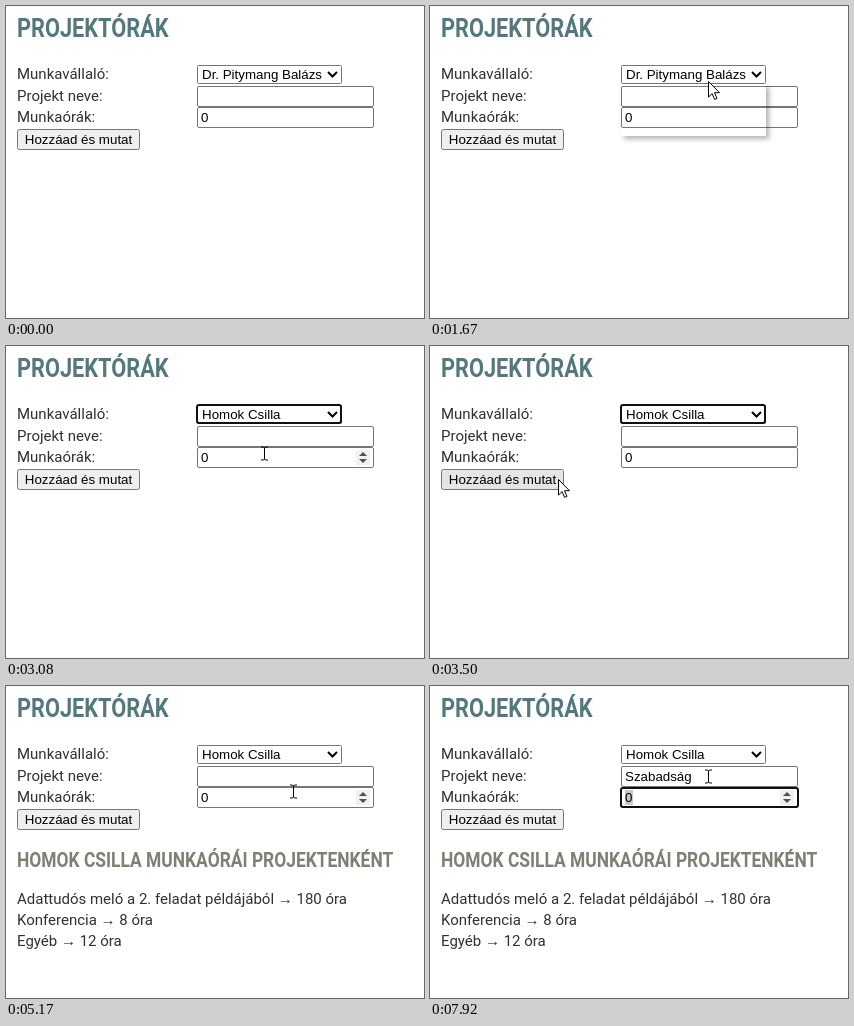
Animation, 418 px wide and 312 px high, one loop 8 s. Source, as an HTML page:

```html
<!DOCTYPE html>
<html lang="hu">
<head>
<meta charset="utf-8">
<title>Projektórák</title>
<style>
  html, body { margin: 0; width: 100%; height: 100%; overflow: hidden; background: #fff; }
  svg { position: absolute; left: 0; top: 0; }
  text { font: 15px Roboto, sans-serif; fill: #2e3135; white-space: pre; }
  .title { font-weight: 700; transform: scaleX(.87); }
  .ctl { font: 13.333px "Liberation Sans", Arial, sans-serif; fill: #000; }
  .box { fill: #fff; stroke: #767676; }
  .ring { fill: none; stroke: #101010; stroke-width: 2; }
  #popup { position: absolute; left: 191px; top: 78px; width: 145px; height: 52px; box-sizing: border-box;
    box-shadow: 3px 3px 5px rgba(0,0,0,.3); font: 13.333px/16.5px "Liberation Sans", Arial, sans-serif; }
  #popup.open { background: #fff; border: 1px solid #767676; }
  #popup div { height: 16.6px; padding-left: 4px; visibility: hidden; }
  #popup.open div { visibility: visible; }
  #popup .hot { background: #1e90ff; color: #fff; }
</style>
</head>
<body>
<svg width="418" height="312">
  <g transform="translate(11 31)"><text class="title" style="font-size:25px;fill:#54787b">PROJEKTÓRÁK</text></g>
  <text x="11" y="73">Munkavállaló:</text>
  <text x="11" y="95">Projekt neve:</text>
  <text x="11" y="116">Munkaórák:</text>

  <rect class="box" x="191.5" y="59.5" width="144" height="18" rx="1"/>
  <text class="ctl" id="worker" x="196" y="73"></text>
  <path d="M322 66l4.5 4.5 4.5-4.5" fill="none" stroke="#000" stroke-width="2"/>
  <rect class="box" x="191.5" y="80.5" width="176" height="20" rx="1.5"/>
  <text class="ctl" id="project" x="195" y="95"></text>
  <path id="caret" stroke="#000"/>
  <rect class="box" x="191.5" y="101.5" width="176" height="20" rx="1.5"/>
  <rect id="marked" x="195" y="104" width="8" height="15" fill="#c8c8c8"/>
  <text class="ctl" x="195" y="116">0</text>
  <g id="spin">
    <rect x="350" y="104" width="14" height="15" fill="#f1f1f1"/>
    <path d="M353 110l4-4 4 4zM353 113l4 4 4-4z" fill="#505050"/>
  </g>
  <rect class="box" id="button" x="11.5" y="123.5" width="122" height="20" rx="2"/>
  <text class="ctl" x="72.5" y="138" text-anchor="middle">Hozzáad és mutat</text>

  <rect class="ring" id="ringWorker" x="191" y="59" width="144" height="18" rx="2"/>
  <rect class="ring" id="ringProject" x="191" y="81" width="177" height="19" rx="2"/>
  <rect class="ring" id="ringHours" x="191" y="102" width="177" height="19" rx="2"/>

  <g id="result">
    <g transform="translate(11 180.5)"><text class="title" style="font-size:20px;fill:#7f7f74">HOMOK CSILLA MUNKAÓRÁI PROJEKTENKÉNT</text></g>
    <text x="11" y="218">Adattudós meló a 2. feladat példájából → 180 óra</text>
    <text x="11" y="239">Konferencia → 8 óra</text>
    <text x="11" y="260">Egyéb → 12 óra</text>
  </g>
</svg>
<div id="popup"><div>Dr. Pitymang Balázs</div><div>Homok Csilla</div><div>Morzsa K. Ernő</div></div>
<svg width="418" height="312">
  <path id="arrow" d="M.5.5v15.6l3.6-3.5 2.5 5.8 2.4-1-2.5-5.7h5z" fill="#fff" stroke="#000"/>
  <path id="beam" d="M-3.5-6.5h2.5l1 1 1-1h2.5M0-5.5v11M-3.5 6.5h2.5l1-1 1 1h2.5" fill="none" stroke="#000"/>
</svg>
<script>
const LOOP = 8000;
const $ = id => document.getElementById(id);
const show = (id, on) => $(id).style.display = on ? '' : 'none';
const rows = [...$('popup').children];

// Pointer stops: time, x, y
const stops = [
  [80, 160, 124], [830, 195, 124], [1220, 235, 166], [1540, 278, 75], [1750, 278, 75],
  [2500, 276, 91], [2670, 275, 92], [2880, 272, 104], [3000, 272, 104], [3420, 128, 133],
  [4250, 128, 133], [4550, 200, 292], [4830, 290, 200], [5000, 290, 200], [5150, 287, 105],
  [5400, 287, 105], [5750, 278, 90]
];
// Times at which each letter is typed
const word = 'Szabadság';
const keys = [6330, 6500, 6670, 6750, 6830, 7000, 7080, 7250, 7330];

function pointer(t) {
  const i = stops.findIndex(s => s[0] > t);
  if (i < 0) return stops[stops.length - 1].slice(1);
  const [t0, x0, y0] = stops[Math.max(i - 1, 0)], [t1, x1, y1] = stops[i];
  const u = Math.max(0, (t - t0) / (t1 - t0 || 1)), e = u * u * (3 - 2 * u);
  return [x0 + (x1 - x0) * e, y0 + (y1 - y0) * e];
}

function render(t) {
  const [x, y] = pointer(t).map(Math.round);
  const over = (l, top, r, b) => t >= 80 && x >= l && x < r && y >= top && y < b;
  const popup = t >= 1640 && t < 2920, chosen = t >= 2920;
  const onHours = over(191, 101, 368, 122) && !popup;
  const onField = onHours || over(191, 80, 368, 101) && !popup;

  $('worker').textContent = rows[chosen ? 1 : 0].textContent;
  show('ringWorker', chosen && t < 3600);
  show('popup', popup);
  $('popup').className = t >= 1740 ? 'open' : '';
  const hot = y < 96 ? 0 : y < 113 ? 1 : 2;
  rows.forEach((row, i) => row.className = i === hot ? 'hot' : '');

  $('button').style.fill = over(11, 123, 134, 144) ? '#e5e5e5' : '#efefef';
  show('result', t >= 3750);

  const typing = t >= 6000 && t < 7670, hours = t >= 7670;
  $('project').textContent = word.slice(0, keys.filter(k => k <= t).length);
  show('ringProject', typing);
  show('ringHours', hours);
  show('marked', hours);
  show('spin', hours || onHours);
  show('caret', typing && t < 7840);
  const end = Math.floor(195 + $('project').getComputedTextLength()) + .5;
  $('caret').setAttribute('d', `M${end} 83v14`);

  show('arrow', t >= 80 && !onField);
  show('beam', onField);
  $('arrow').setAttribute('transform', `translate(${x} ${y})`);
  $('beam').setAttribute('transform', `translate(${x + .5} ${y + .5})`);
}

function tick() {
  render(performance.now() % LOOP);
  requestAnimationFrame(tick);
}
tick();
</script>
</body>
</html>
```
